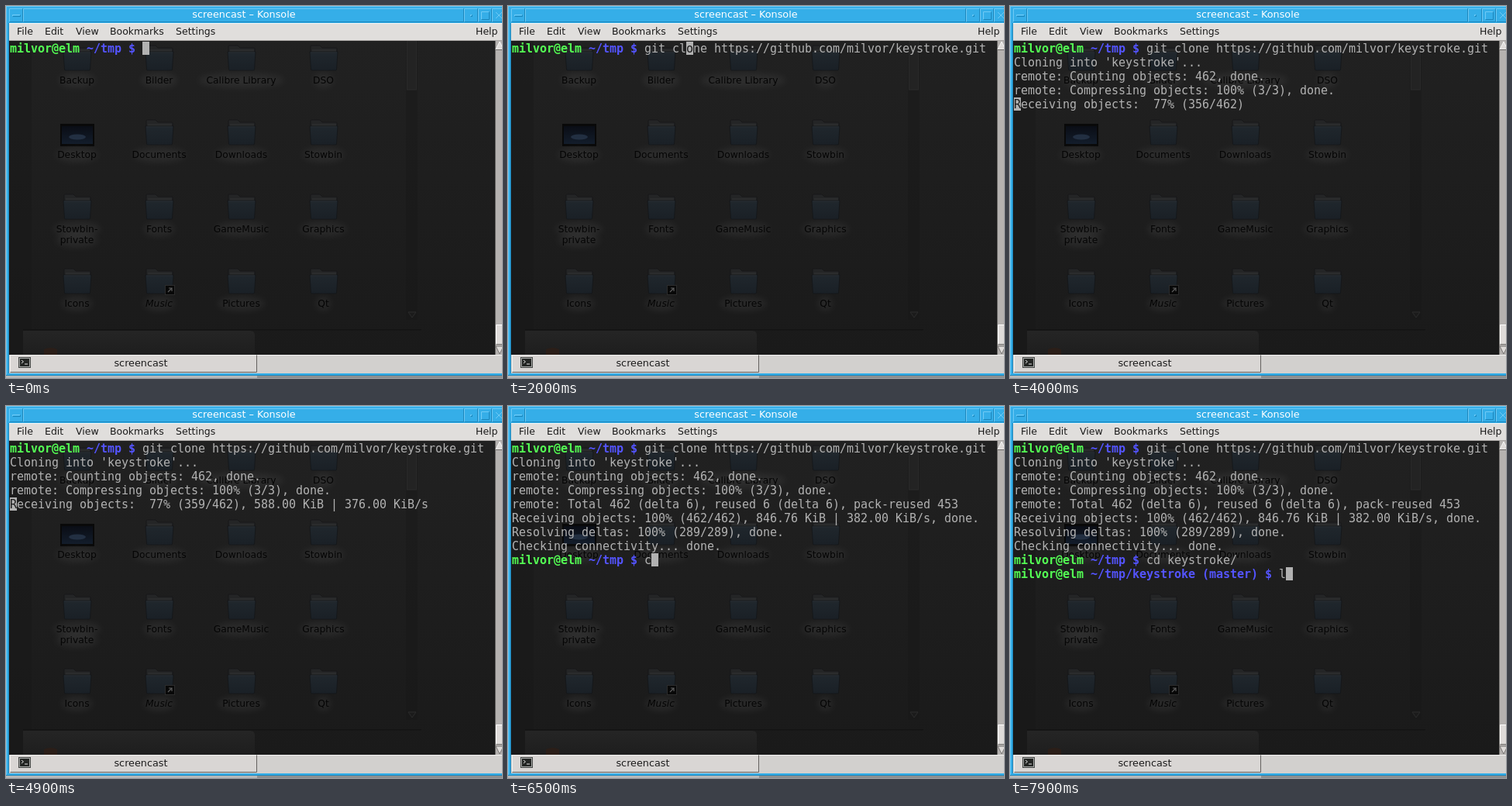
An HTML page for the animation above (8 s loop, 640x480 px).

```html
<!DOCTYPE html>
<html lang="en">
<head>
<meta charset="utf-8">
<title>Terminal screencast</title>
<style>
html, body { margin: 0; width: 100%; height: 100%; overflow: hidden; background: #35aee8; }
#stage { position: relative; width: 640px; height: 480px; overflow: hidden; }
svg { position: absolute; left: 0; top: 0; font-family: "DejaVu Sans", sans-serif; }
#term { position: absolute; left: 5px; top: 46px; color: #b2b2b2;
  font: 15px/18px "DejaVu Sans Mono", monospace; letter-spacing: -.03px; white-space: pre; }
#term div { height: 18px; }
#term b { color: #54ff54; }
#term b + b { color: #5454ff; }
#term #cursor { position: absolute; left: 0; top: 0; width: 9px; height: 17px; background: #b2b2b2; color: #1c1c1c; }
.label { font-size: 12.3px; text-anchor: middle; fill: #050505; }
.menu { font-size: 12.5px; fill: #1b1b1b; }
.title { font-size: 12.8px; text-anchor: middle; }
</style>
</head>
<body>
<div id="stage">
  <svg id="scene" width="640" height="480" viewBox="0 0 640 480"></svg>
  <div id="term"></div>
</div>
<script>
const LOOP = 8000, CELL = 9, LINE = 18;

// Scene helpers
const rect = (x, y, w, h, fill, more = '') =>
  `<rect x="${x}" y="${y}" width="${w}" height="${h}" fill="${fill}" ${more}/>`;
const path = (d, fill, more = '') => `<path d="${d}" fill="${fill}" ${more}/>`;
const text = (x, y, str, cls, more = '') => `<text x="${x}" y="${y}" class="${cls}" ${more}>${str}</text>`;
const bevel = (x, y, w, h, light, dark) =>
  path(`M${x + .5} ${y + h - .5}V${y + .5}H${x + w - .5}`, 'none', `stroke="${light}"`) +
  path(`M${x + w - .5} ${y + .5}V${y + h - .5}H${x + .5}`, 'none', `stroke="${dark}"`);

const folder = (x, y) =>
  path(`M${x - 17} ${y + 9}V${y + 1}q0-1 1-1h11l3 3h18q1 0 1 1v5z`, '#242526', 'stroke="#161617" stroke-width=".8"') +
  rect(x - 15, y + 5, 31, 4, '#2b2c2d') +
  path(`M${x - 18} ${y + 8}h36l-1.5 23q0 1-1.5 1h-30q-1.500 0-1.500-1z`, 'url(#folder)', 'stroke="#141618" stroke-width=".8"') +
  path(`M${x - 17} ${y + 9}h34`, 'none', 'stroke="#2c3237" stroke-width=".8"');

const thumbnail = (x, y) =>
  rect(x - 22, y, 44, 29, '#090909') +
  rect(x - 20, y + 3, 40, 23, 'url(#screen)') +
  `<ellipse cx="${x}" cy="${y + 17}" rx="11" ry="3.500" fill="#2b3a50" opacity=".7"/>`;

const label = (x, y, str, style) => {
  const w = str.length * 7 + 4;
  return `<ellipse cx="${x}" cy="${y - 4}" rx="${w / 2}" ry="9" fill="#fff" opacity=".06" filter="url(#soft)"/>` +
    text(x, y, str, 'label', style);
};

function desktop() {
  const names = [
    ['Backup', 'Bilder', 'Calibre Library', 'DSO'],
    ['Desktop', 'Documents', 'Downloads', 'Stowbin'],
    ['Stowbin-', 'Fonts', 'GameMusic', 'Graphics'],
    ['Icons', 'Music', 'Pictures', 'Qt']
  ];
  let out = rect(4, 45, 628, 405, 'url(#back)') +
    rect(4, 45, 18, 405, '#171717', 'opacity=".4"') +
    rect(22, 45, 11, 373, '#171717', 'opacity=".4"') +
    rect(516, 45, 15, 360, '#171717', 'opacity=".4"') +
    rect(517.5, 45, 12, 63, '#232323', 'stroke="#2a2a2a"') +
    path('M519 395h10l-5 7z', '#1b1b1b', 'stroke="#2c2c2c"') +
    rect(22, 417, 514, 1.5, '#141414') +
    path('M22 450V419H315q6 0 6 6v25z', 'url(#panel)') +
    path('M49 450v-7q9-4 17 0v7z', '#2e1e17', 'opacity=".8"');
  names.forEach((row, r) => row.forEach((name, c) => {
    const x = 92 + c * 106, y = 54 + r * 96;
    out += name === 'Desktop' ? thumbnail(x, y + 2) : folder(x, y - 3);
    out += label(x - .5, y + 46, name, name === 'Music' ? 'font-style="italic"' : '');
  }));
  return out + label(91.5, 306, 'private') +
    rect(205.5, 360.5, 12, 12, '#080808', 'stroke="#2c2c2c"') +
    path('M209 369l5-5m-4 0h4v4', 'none', 'stroke="#5c5c5c" stroke-width="1.2"');
}

function frame() {
  const blue = '#35aee8', light = '#70caf5', dark = '#1c86bb', grey = '#e0dedc';
  const menus = [[14, 'File'], [50, 'Edit'], [90, 'View'], [134, 'Bookmarks'], [219, 'Settings'], [606, 'Help']];
  return rect(0, 0, 640, 22, blue) + rect(0, 0, 4, 477, blue) + rect(0, 474, 640, 3, blue) +
    rect(0, 0, 640, 1, light) + rect(0, 0, 1, 477, light) + rect(3, 22, 1, 452, dark) +
    rect(0, 476, 640, 1, dark) + rect(0, 477, 640, 3, '#8b8f91') + rect(0, 477, 324, 3, '#b5b8b9') +
    bevel(4, 3, 18, 18, light, dark) + bevel(22, 3, 569, 18, light, dark) +
    bevel(591, 3, 18, 18, light, dark) + bevel(609, 3, 18, 18, light, dark) + bevel(627, 3, 18, 18, light, dark) +
    bevel(8, 11, 11, 3, light, dark) + bevel(599, 11, 3, 3, light, dark) + bevel(613, 7, 11, 11, light, dark) +
    path('M632 8l8 8m0-8l-8 8', 'none', `stroke="${light}"`) +
    text(307, 15, 'screencast – Konsole', 'title', 'fill="#fff"') +
    rect(4, 22, 636, 23, grey) + rect(4, 22, 636, 1, '#f6f5f4') + rect(4, 44, 636, 1, '#aaa7a5') +
    menus.map(([x, name]) => text(x, 37, name, 'menu')).join('') +
    // scrollbar
    rect(631, 45, 9, 405, '#b5b2b0') + rect(631, 45, 1, 405, '#777573') +
    path('M632 56l5-10 5 10z', '#dedbd9', 'stroke="#f8f8f8"') + rect(632, 56, 8, 1, '#686563') +
    rect(632, 411, 8, 26, '#dedbd9') + bevel(632, 411, 14, 26, '#fff', '#777573') +
    path('M632 439h10l-5 10z', '#dedbd9', 'stroke="#777573"') +
    // tab bar
    rect(4, 450, 636, 24, '#d2d0ce') + rect(324, 450, 316, 1, '#f2f1f0') +
    rect(5, 450, 319, 23, '#d9d6d4') + bevel(5, 450, 319, 23, '#f2f1f0', '#64615f') +
    rect(16, 453, 16, 14, '#454745') + rect(17, 454, 14, 12, '#a9aba9') + rect(18, 455, 12, 10, '#232523') +
    path('M20 457l2.500 2-2.500 2M24 462h4', 'none', 'stroke="#ddd"') +
    text(174, 465, 'screencast', 'title', 'fill="#1b1b1b"');
}

const gradient = (id, from, to) =>
  `<linearGradient id="${id}" x2="0" y2="1"><stop stop-color="${from}"/><stop offset="1" stop-color="${to}"/></linearGradient>`;

document.getElementById('scene').innerHTML = '<defs>' +
  gradient('back', '#212121', '#1a1a1a') + gradient('folder', '#20272d', '#1a2026') +
  gradient('screen', '#0a0d15', '#131d2b') + gradient('panel', '#252525', '#1e1e1e') +
  '<filter id="soft" x="-30%" y="-80%" width="160%" height="260%"><feGaussianBlur stdDeviation="4"/></filter></defs>' +
  desktop() + frame();

// Terminal session: each step is [time, first row, lines, cursor row, cursor column, character under cursor]
const prompt = dir => `<b>milvor@elm</b> <b>${dir} $</b> `;
const home = prompt('~/tmp'), repo = prompt('~/tmp/keystroke (master)');
const command = 'git clone https://github.com/milvor/keystroke.git';
const START = 19, REPO_START = 38;

const typed = (time, row, str) => [time, row, [home + str], row, START + str.length];
const receiving = (time, pct, count = Math.ceil(4.62 * pct), rate = '') =>
  [time, 4, [`Receiving objects: ${String(pct).padStart(3)}% (${count}/462)${rate}`], 4, 0, 'R'];

const steps = [
  typed(0, 0, ''),
  ...[1, 2, 3, 4].map(n => typed(800 + n * 100, 0, command.slice(0, n))),
  typed(1400, 0, 'git c'),
  typed(1500, 0, 'git cl'),
  [2000, 0, [home + command], 0, START + 6, 'o'],
  [2700, 1, ["Cloning into 'keystroke'..."], 2, 0],
  [3500, 2, ['remote: Counting objects: 462, done.', 'remote: Compressing objects: 100% (3/3), done.'], 4, 0],
  ...[9, 26, 43, 60, 77].map((pct, i) => receiving(3600 + i * 100, pct)),
  receiving(4900, 77, 359, ', 588.00 KiB | 376.00 KiB/s'),
  [5100, 4, [
    'remote: Total 462 (delta 6), reused 6 (delta 6), pack-reused 453',
    'Receiving objects: 100% (462/462), 846.76 KiB | 382.00 KiB/s, done.',
    'Resolving deltas: 100% (289/289), done.',
    'Checking connectivity... done.',
    home
  ], 8, START],
  typed(6500, 8, 'c'),
  typed(6600, 8, 'cd '),
  typed(6800, 8, 'cd k'),
  typed(6900, 8, 'cd ke'),
  typed(7000, 8, 'cd keystroke/'),
  [7500, 9, [repo], 9, REPO_START],
  [7900, 9, [repo + 'l'], 9, REPO_START + 1]
];

const term = document.getElementById('term');
let shown = -1;

function draw(now) {
  const t = now % LOOP;
  const last = steps.filter(step => step[0] <= t).length - 1;
  if (last === shown) return;
  shown = last;
  const rows = [];
  for (const [, first, lines] of steps.slice(0, last + 1)) {
    lines.forEach((line, i) => { rows[first + i] = line; });
  }
  const [, , , row, col, char = ''] = steps[last];
  term.innerHTML = rows.map(line => `<div>${line}</div>`).join('') +
    `<div id="cursor" style="transform:translate(${col * CELL}px,${row * LINE}px)">${char}</div>`;
}

function tick() {
  draw(performance.now());
  requestAnimationFrame(tick);
}
tick();
</script>
</body>
</html>
```
